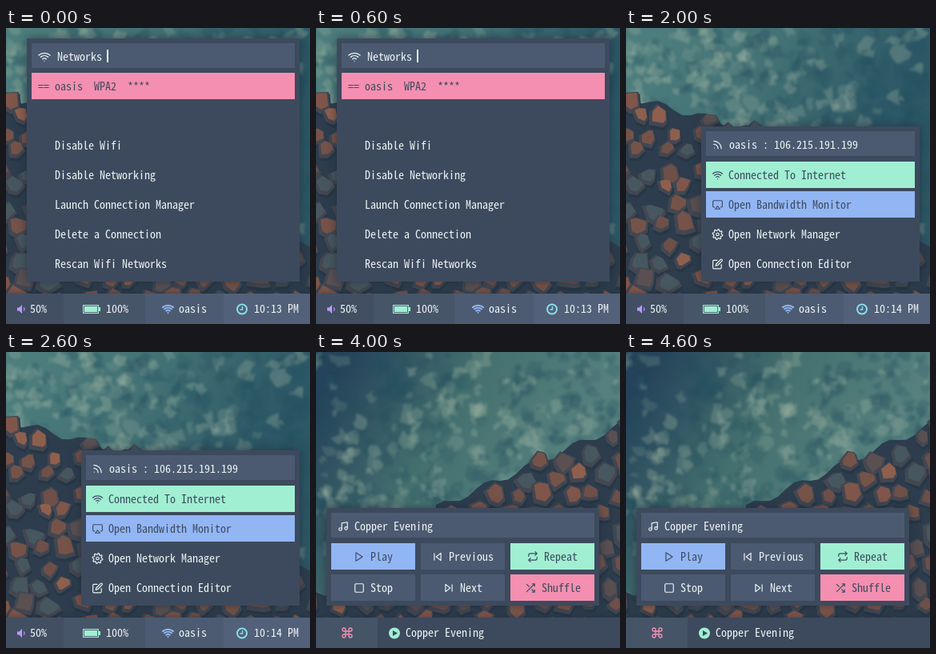
These frames come from a looping animation (380x370 px, 5000 ms). An HTML page with a canvas:

```html
<!DOCTYPE html>
<html lang="en">
<head>
<meta charset="utf-8">
<title>Desktop menus</title>
<style>
  html, body { margin: 0; width: 100%; height: 100%; overflow: hidden; background: #3d4c5f; }
  canvas { display: block; }
</style>
</head>
<body>
<canvas id="stage" width="380" height="370"></canvas>
<script>
const W = 380, H = 370, BAR = 332;
const ctx = document.getElementById('stage').getContext('2d');
const C = {
  bg: '#3d4a5d', item: '#4b5a70', fg: '#eef4f5', ink: '#3d4c5f', pink: '#f48fb1',
  green: '#a1efd3', blue: '#92b6f4', purple: '#bd99ff', cyan: '#87dfeb'
};

// Pick the size that gives a 7px character cell
const FAMILY = '"Noto Sans Mono CJK JP", "Noto Sans Mono CJK SC", "Noto Sans Mono", monospace';
ctx.font = `100px ${FAMILY}`;
const FONT = `${700 / ctx.measureText('M').width}px ${FAMILY}`;

function gear() {
  let d = 'M15 12a3 3 0 1 1-6 0a3 3 0 1 1 6 0';
  for (let i = 0; i < 32; i++) {
    const r = i % 4 < 2 ? 11 : 8.2, a = (i + 0.5) * Math.PI / 16;
    d += (i ? 'L' : 'M') + (12 + r * Math.cos(a)) + ' ' + (12 + r * Math.sin(a));
  }
  return d + 'Z';
}

// Line icons on a 24-unit grid
const ICONS = {
  wifi: 'M5 12.55a11 11 0 0 1 14.08 0M1.42 9a16 16 0 0 1 21.16 0M8.53 16.11a6 6 0 0 1 6.95 0M12 20h.01',
  power: 'M18.36 6.64a9 9 0 1 1-12.73 0M12 2v10',
  lock: 'M5 11h14a2 2 0 0 1 2 2v7a2 2 0 0 1-2 2H5a2 2 0 0 1-2-2v-7a2 2 0 0 1 2-2zM7 11V7a5 5 0 0 1 10 0v4',
  moon: 'M21 12.8A9 9 0 1 1 11.2 3a7 7 0 0 0 9.8 9.8z',
  logout: 'M9 21H5a2 2 0 0 1-2-2V5a2 2 0 0 1 2-2h4M16 17l5-5-5-5M21 12H9',
  refresh: 'M23 4v6h-6M1 20v-6h6M3.5 9a9 9 0 0 1 14.9-3.4L23 10M1 14l4.6 4.4A9 9 0 0 0 20.5 15',
  rss: 'M4 11a9 9 0 0 1 9 9M4 4a16 16 0 0 1 16 16M5 19h.01',
  airplay: 'M5 17H4a2 2 0 0 1-2-2V5a2 2 0 0 1 2-2h16a2 2 0 0 1 2 2v10a2 2 0 0 1-2 2h-1M12 15l5 6H7z',
  gear: gear(),
  edit: 'M11 4H4a2 2 0 0 0-2 2v14a2 2 0 0 0 2 2h14a2 2 0 0 0 2-2v-7M18.5 2.5a2.1 2.1 0 0 1 3 3L12 15l-4 1 1-4z',
  image: 'M5 3h14a2 2 0 0 1 2 2v14a2 2 0 0 1-2 2H5a2 2 0 0 1-2-2V5a2 2 0 0 1 2-2zM10 8.5a1.5 1.5 0 1 1-3 0a1.5 1.5 0 1 1 3 0M21 15l-5-5L5 21',
  monitor: 'M4 3h16a2 2 0 0 1 2 2v10a2 2 0 0 1-2 2H4a2 2 0 0 1-2-2V5a2 2 0 0 1 2-2zM8 21h8M12 17v4',
  crop: 'M6 1v15a2 2 0 0 0 2 2h15M1 6h15a2 2 0 0 1 2 2v15',
  layout: 'M5 3h14a2 2 0 0 1 2 2v14a2 2 0 0 1-2 2H5a2 2 0 0 1-2-2V5a2 2 0 0 1 2-2zM3 9h18M9 21V9',
  music: 'M9 18V5l12-2v13M9 18a3 3 0 1 1-6 0a3 3 0 1 1 6 0M21 16a3 3 0 1 1-6 0a3 3 0 1 1 6 0',
  play: 'M5 3l14 9-14 9z',
  prev: 'M19 20L9 12l10-8zM5 19V5',
  next: 'M5 4l10 8-10 8zM19 5v14',
  stop: 'M5 3h14a2 2 0 0 1 2 2v14a2 2 0 0 1-2 2H5a2 2 0 0 1-2-2V5a2 2 0 0 1 2-2z',
  repeat: 'M17 1l4 4-4 4M3 11V9a4 4 0 0 1 4-4h14M7 23l-4-4 4-4M21 13v2a4 4 0 0 1-4 4H3',
  shuffle: 'M16 3h5v5M4 20L21 3M21 16v5h-5M15 15l6 6M4 4l5 5',
  command: 'M18 3a3 3 0 0 0-3 3v12a3 3 0 1 0 3-3H6a3 3 0 1 0 3 3V6a3 3 0 1 0-3 3h12a3 3 0 0 0 0-6z'
};

function box(x0, y0, x1, y1, color) {
  ctx.fillStyle = color;
  ctx.fillRect(x0, y0, x1 - x0, y1 - y0);
}

function text(str, x, mid, color = C.fg) {
  ctx.fillStyle = color;
  ctx.fillText(str, x, mid + 5);
}

function icon(name, x, y, color = C.fg, size = 14, weight = 2) {
  ctx.save();
  ctx.translate(x - size / 2, y - size / 2);
  ctx.scale(size / 24, size / 24);
  ctx.strokeStyle = color;
  ctx.lineWidth = weight;
  ctx.lineCap = ctx.lineJoin = 'round';
  ctx.stroke(new Path2D(ICONS[name]));
  ctx.restore();
}

function panel(x0, y0, x1) {
  ctx.save();
  ctx.shadowColor = 'rgba(25,35,50,.6)';
  ctx.shadowBlur = 12;
  box(x0, y0, x1, 317, C.bg);
  ctx.restore();
  box(x0 + 6, y0 + 6, x1 - 6, y0 + 37, C.item);
}

// Title plus rows of [icon, label, highlight]
function menu(x, y, title, rows, gap = 35) {
  panel(x, y, 367);
  icon(title[0], x + 20.5, y + 23);
  text(title[1], x + gap, y + 23);
  rows.forEach(([name, label, hot], i) => {
    const mid = 295 - 37 * (rows.length - 1 - i);
    if (hot) box(x + 6, mid - 17, 361, mid + 16, hot);
    icon(name, x + 20.5, mid, hot ? C.ink : C.fg);
    text(label, x + 34, mid, hot ? C.ink : C.fg);
  });
}

function barBase() {
  ctx.save();
  ctx.shadowColor = 'rgba(25,35,50,.5)';
  ctx.shadowBlur = 8;
  box(0, BAR, W, H, C.bg);
  ctx.restore();
}

function statusBar(time) {
  barBase();
  box(0, BAR, 72, H, '#424f63');
  box(72, BAR, 174, H, '#475569');
  box(174, BAR, 272, H, '#4c5b72');
  box(272, BAR, W, H, '#526179');

  ctx.fillStyle = C.purple;
  ctx.fill(new Path2D('M14 349.5h2.5l3.5-3.5v11l-3.5-3.5h-2.5z'));
  ctx.strokeStyle = C.purple;
  ctx.lineWidth = 1.1;
  ctx.stroke(new Path2D('M22 349.5a2.4 2.4 0 0 1 0 4'));
  text('50%', 30, 351);

  ctx.strokeStyle = C.green;
  ctx.strokeRect(96.6, 346.6, 18.8, 9.8);
  box(98, 348, 114, 355, C.green);
  box(116, 349, 118, 354, C.green);
  text('100%', 125, 351);

  icon('wifi', 202.5, 351, C.blue, 15, 3.2);
  text('oasis', 216, 351);

  ctx.strokeStyle = C.cyan;
  ctx.lineWidth = 2;
  ctx.beginPath();
  ctx.arc(295, 351.5, 6, 0, 7);
  ctx.stroke();
  ctx.lineWidth = 1.5;
  ctx.stroke(new Path2D('M295.5 348v4h-3'));
  text(time, 310, 351);
}

const TRACK = 'Copper Evening';

function musicBar() {
  barBase();
  box(0, BAR, 77, H, '#465468');
  icon('command', 39, 351, C.pink, 16);
  ctx.fillStyle = C.green;
  ctx.beginPath();
  ctx.arc(98, 351.5, 7, 0, 7);
  ctx.fill();
  ctx.fillStyle = C.bg;
  ctx.fill(new Path2D('M96 348l6 3.5-6 3.5z'));
  text(TRACK, 112, 351);
}

function networks() {
  panel(26, 13, 367);
  icon('wifi', 48, 36, C.fg, 16);
  text('Networks', 64, 36);
  box(126, 27, 128, 43, C.fg);
  box(32, 56, 361, 89, C.pink);
  text('== oasis  WPA2  ****', 40, 73, C.ink);
  ['Disable Wifi', 'Disable Networking', 'Launch Connection Manager',
    'Delete a Connection', 'Rescan Wifi Networks']
    .forEach((label, i) => text(label, 61, 147 + 37 * i));
}

function player() {
  panel(13, 195, 354);
  icon('music', 34, 218);
  text(TRACK, 48, 218);
  const button = (col, mid, name, ix, label, hot) => {
    const x = 19 + 112 * col, ink = hot ? C.ink : C.fg;
    box(x, mid - 17, x + 105, mid + 16, hot || C.item);
    icon(name, ix, mid, ink);
    text(label, ix + 14, mid, ink);
  };
  button(0, 256, 'play', 54, 'Play', C.blue);
  button(1, 256, 'prev', 152, 'Previous');
  button(2, 256, 'repeat', 271, 'Repeat', C.green);
  button(0, 295, 'stop', 54, 'Stop');
  button(1, 295, 'next', 166, 'Next');
  button(2, 295, 'shuffle', 268, 'Shuffle', C.pink);
}

function seeded(s) {
  return () => (s = (s * 16807) % 2147483647) / 2147483647;
}

// Sea with soft foam patches and a field of rocks below shore(x)
function wallpaper(seed, sea, shore, foam) {
  const c = document.createElement('canvas');
  c.width = W;
  c.height = H;
  const g = c.getContext('2d'), rnd = seeded(seed);
  const fade = g.createLinearGradient(40, 0, 300, 150);
  sea.forEach((tone, i) => fade.addColorStop(i / (sea.length - 1), tone));
  g.fillStyle = fade;
  g.fillRect(0, 0, W, H);

  const ring = (n, r, rough) => Array.from({ length: n }, (_, i) => {
    const a = (i + rnd() * 0.7) * 2 * Math.PI / n;
    const q = r * (1 - rough * rnd());
    return [q * Math.cos(a), q * Math.sin(a)];
  });
  const shape = (pts, x, y, k, color) => {
    g.fillStyle = color;
    g.beginPath();
    pts.forEach(p => g.lineTo(x + p[0] * k, y + p[1] * k));
    g.fill();
  };

  g.filter = 'blur(1.5px)';
  for (let i = 0; i < 700; i++) {
    const x = rnd() * W, y = rnd() * BAR, pts = ring(9, 5 + rnd() * 12, 0.75);
    const pale = rnd() < foam(x, y);
    g.globalAlpha = 0.15 + 0.2 * rnd();
    shape(pts, x, y, 1, pale ? '#a3b8a5' : '#24505f');
  }
  g.filter = 'none';
  g.globalAlpha = 1;

  g.fillStyle = '#2d3d4d';
  g.beginPath();
  g.moveTo(0, H);
  for (let x = 0; x <= W; x += 10) g.lineTo(x, shore(x) + 5 * Math.sin(x / 9));
  g.lineTo(W, H);
  g.fill();

  const shades = ['#80564a', '#8f5f4d', '#6e5049', '#765349', '#47575f', '#5a5052'];
  for (let row = 0; row < 12; row++) {
    for (let col = 0; col < 13; col++) {
      const x = col * 32 + (row % 2) * 16 + rnd() * 16 - 12;
      const y = 82 + row * 23 + rnd() * 12;
      const tone = shades[Math.floor(rnd() * shades.length)];
      const pts = ring(6, 13 + rnd() * 7, 0.35);
      if (y < shore(x)) continue;
      shape(pts, x + 1, y + 3, 1.05, '#273746');
      shape(pts, x, y, 1, '#434751');
      shape(pts, x + 1, y - 2, 0.74, tone);
    }
  }
  return c;
}

const near = (x, y, cx, cy, rx, ry) =>
  Math.exp(-(((x - cx) / rx) ** 2) - ((y - cy) / ry) ** 2);

const coast = wallpaper(71, ['#4d7d7d', '#427074', '#2d5866'],
  x => 85 + x * 0.27 + Math.max(0, x - 240) * 0.65,
  (x, y) => 0.15 + 0.4 * near(x, y, 40, 30, 110, 70) + 0.5 * near(x, y, 150, 85, 120, 45));
const cove = wallpaper(137, ['#25435a', '#44706f', '#55807e'],
  x => x < 150 ? 300 : 195 - (x - 150) * 0.45,
  (x, y) => 0.1 + 0.75 * near(x, y, 230, 85, 100, 70) + 0.7 * near(x, y, 60, 165, 100, 50));

const scenes = [
  () => { networks(); statusBar('10:13 PM'); },
  () => {
    menu(94, 87, ['power', 'UP - 2 hours, 5 minutes'], [
      ['lock', 'Lock', C.pink], ['moon', 'Sleep'], ['logout', 'Logout'],
      ['refresh', 'Restart'], ['power', 'Shutdown']]);
    statusBar('10:13 PM');
  },
  () => {
    menu(94, 123, ['rss', 'oasis : 106.215.191.199'], [
      ['wifi', 'Connected To Internet', C.green],
      ['airplay', 'Open Bandwidth Monitor', C.blue],
      ['gear', 'Open Network Manager'], ['edit', 'Open Connection Editor']]);
    statusBar('10:14 PM');
  },
  () => {
    menu(163, 161, ['image', 'Take A Shot'], [
      ['monitor', 'Whole Desktop'], ['crop', 'Selected Area', C.pink],
      ['layout', 'Focused Window']], 37);
    statusBar('10:14 PM');
  },
  () => { player(); musicBar(); }
];

const start = performance.now();
function draw() {
  const t = Math.max(0, performance.now() - start) % 5000;
  const n = Math.floor(t / 1000);
  ctx.font = FONT;
  ctx.drawImage(n === 4 ? cove : coast, 0, 0);
  scenes[n]();
  requestAnimationFrame(draw);
}
draw();
</script>
</body>
</html>
```
